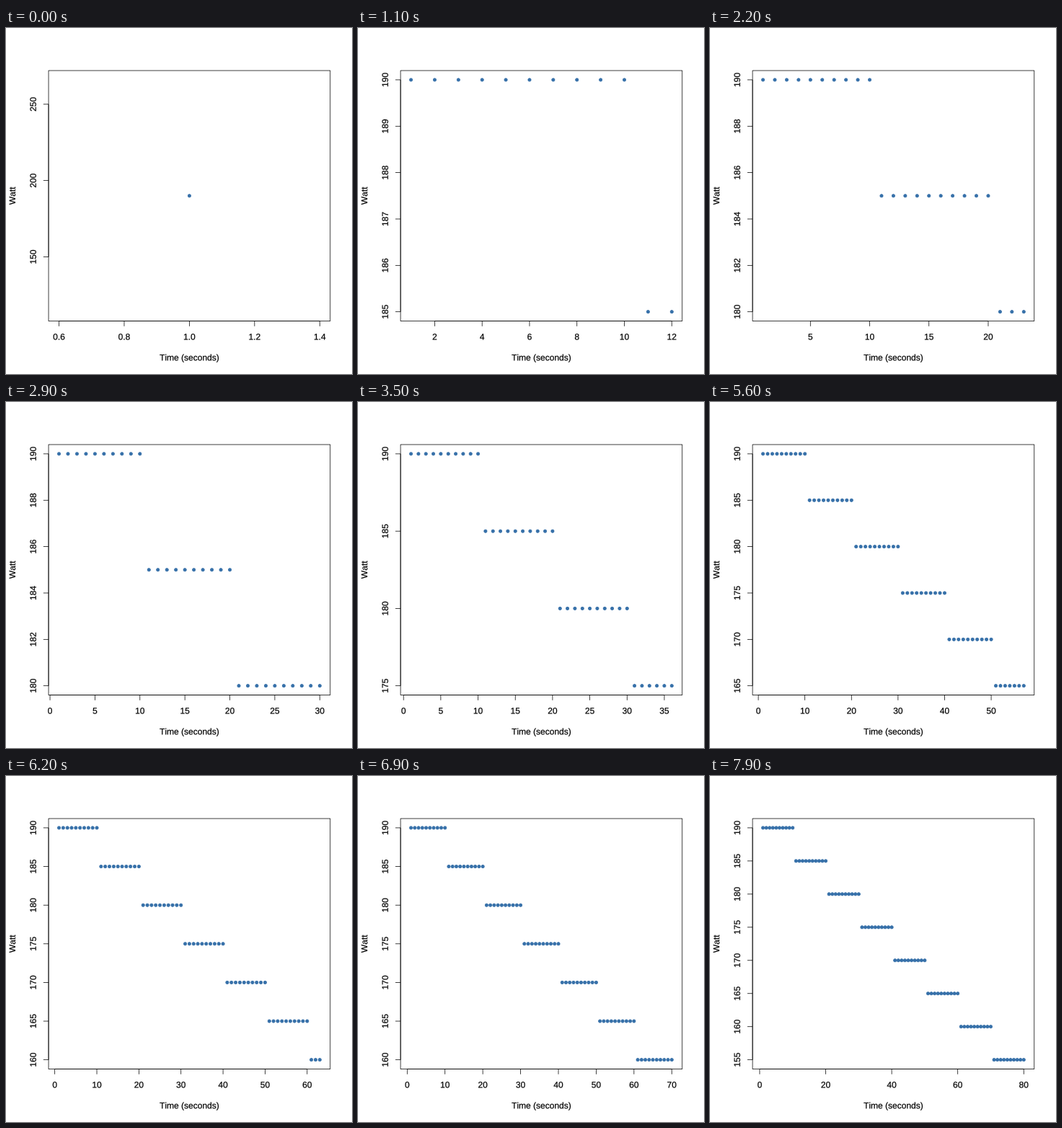
Write a matplotlib script that moves like this. It is 480 by 480 pixels and loops after 8 s.

```python
import math

import matplotlib.pyplot as plt
import numpy as np
from matplotlib.animation import FuncAnimation
from matplotlib.patches import PathPatch, Rectangle
from matplotlib.path import Path
from matplotlib.textpath import TextPath
from matplotlib.transforms import Affine2D

SIZE, DPI = 480, 96
PX = 72 / DPI  # points per pixel
LINE = 14.4  # height of one margin line
LEFT, RIGHT = 4.1 * LINE, SIZE - 2.1 * LINE
TOP, BOTTOM = 4.1 * LINE, SIZE - 5.1 * LINE
TICK = 7.2
FONT = 12
STROKE = 0.75 * PX
BLUE = "#3670a9"
RADIUS = 2.1
STEPS, INTERVAL = 80, 100
X_TITLE, Y_TITLE = "Time (seconds)", "Watt"

plt.rcParams["font.family"] = "Liberation Sans"


def outline(text):
    return TextPath((0, 0), text, size=FONT)


def advance(char):
    """Pen advance, side bearings included, measured between two bars."""
    return (outline(f"|{char}|").get_extents().width
            - outline("||").get_extents().width)


GLYPHS = {c: (outline(c), advance(c))
          for c in set("0123456789." + X_TITLE + Y_TITLE)}


def limits(values):
    """Data range with 4 % padding; a single value is widened by 40 %."""
    lo, hi = float(min(values)), float(max(values))
    if lo == hi:
        lo, hi = lo * 0.6, hi * 1.4
    pad = 0.04 * (hi - lo)
    return lo - pad, hi + pad


def pretty(lo, hi):
    """Round tick values inside the limits, about five intervals."""
    cell = (hi - lo) / 5
    base = 10.0 ** math.floor(math.log10(cell))
    unit = base
    for factor, bias in ((2, 0.8), (5, 1.7), (10, 0.8)):
        if factor * base - cell >= bias * (cell - unit):
            break
        unit = factor * base
    first = math.ceil(lo / unit - 1e-9)
    last = math.floor(hi / unit + 1e-9)
    digits = max(0, -math.floor(math.log10(unit) + 1e-9))
    ticks = [k * unit for k in range(first, last + 1)]
    return ticks, [f"{t:.{digits}f}" for t in ticks]


def line(x, y):
    ax.plot(x, y, color="black", lw=STROKE, solid_capstyle="butt", snap=False)


def label(x, y, text, rotation=0):
    """Text centred on x, y along its baseline, without kerning."""
    pen = -sum(GLYPHS[c][1] for c in text) / 2
    parts = []
    for c in text:
        glyph, step = GLYPHS[c]
        if c != " ":
            parts.append(glyph.transformed(Affine2D().translate(pen, 0)))
        pen += step
    place = Affine2D().scale(1, -1).rotate_deg(-rotation).translate(x, y)
    path = Path.make_compound_path(*parts).transformed(place)
    ax.add_patch(PathPatch(path, fc="black", ec="black", lw=0.2 * PX,
                           snap=False))


def x_axis(lo, hi, to_px):
    ticks, names = pretty(lo, hi)
    at = [to_px(t) for t in ticks]
    line([at[0], at[-1]], [BOTTOM, BOTTOM])
    for x, name in zip(at, names):
        line([x, x], [BOTTOM, BOTTOM + TICK])
        label(x, BOTTOM + 1.8 * LINE, name)
    label((LEFT + RIGHT) / 2, BOTTOM + 3.8 * LINE, X_TITLE)


def y_axis(lo, hi, to_px):
    ticks, names = pretty(lo, hi)
    at = [to_px(t) for t in ticks]
    line([LEFT, LEFT], [at[0], at[-1]])
    for y, name in zip(at, names):
        line([LEFT - TICK, LEFT], [y, y])
        label(LEFT - 1.2 * LINE, y, name, 90)
    label(LEFT - 3.2 * LINE, (TOP + BOTTOM) / 2, Y_TITLE, 90)


def draw(i):
    ax.clear()
    ax.axis("off")

    time = np.arange(1, i + 2)
    watt = 190 - 5 * ((time - 1) // 10)
    x0, x1 = limits(time)
    y0, y1 = limits(watt)

    def px(t):
        return LEFT + (t - x0) / (x1 - x0) * (RIGHT - LEFT)

    def py(w):
        return BOTTOM - (w - y0) / (y1 - y0) * (BOTTOM - TOP)

    dots = [Path.circle((px(t), py(w)), RADIUS) for t, w in zip(time, watt)]
    ax.add_patch(PathPatch(Path.make_compound_path(*dots), fc=BLUE, ec=BLUE,
                           lw=STROKE, snap=False))

    x_axis(x0, x1, px)
    y_axis(y0, y1, py)
    ax.add_patch(Rectangle((LEFT, TOP), RIGHT - LEFT, BOTTOM - TOP,
                           fill=False, ec="black", lw=STROKE, snap=False))
    ax.set(xlim=(0, SIZE), ylim=(SIZE, 0))


fig = plt.figure(figsize=(SIZE / DPI, SIZE / DPI), dpi=DPI, facecolor="white")
ax = fig.add_axes([0, 0, 1, 1])
anim = FuncAnimation(fig, draw, frames=STEPS, interval=INTERVAL,
                     init_func=lambda: None, repeat=True, repeat_delay=0)
plt.show()
```
